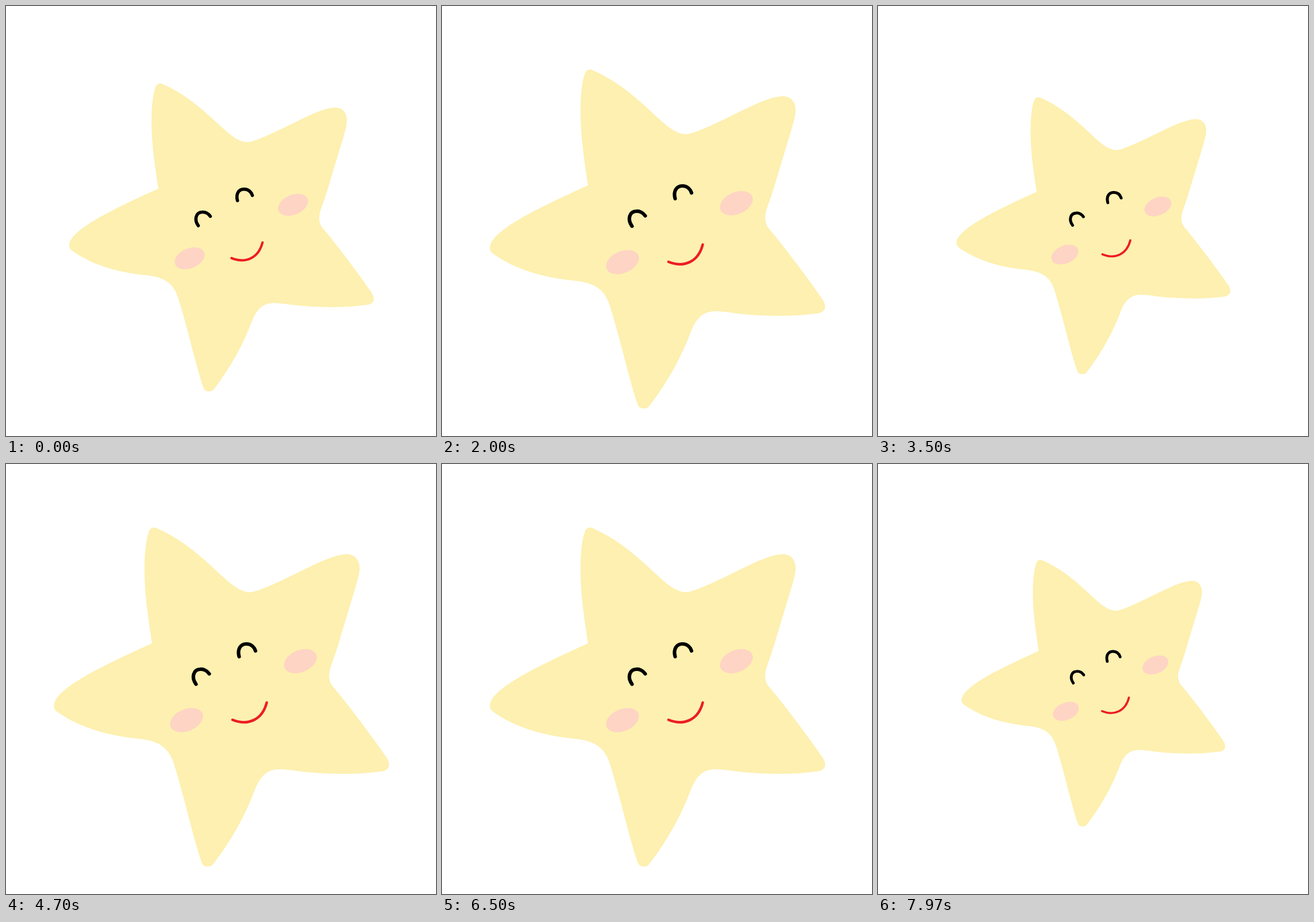
An HTML page that plays this animation: 748 px wide and 748 px high, repeating every 8000 ms.

```html
<!DOCTYPE html>
<html lang="en">
<head>
<meta charset="utf-8">
<title>Pulsing star</title>
<style>
  html, body { margin: 0; width: 100%; height: 100%; overflow: hidden; background: #fff; }
  svg { display: block; width: 100%; height: 100%; }
</style>
</head>
<body>
<svg viewBox="0 0 748 748">
  <g id="star" fill="none" stroke-linecap="round">
    <path fill="#fdf0b0" d="M254 312
      C246 260 241 222 241 183 C241 153 244 130 248.500 118 C251.500 110 257 109 264 112.500
      C298 127 331 153 362 182 C388 206 405 223 425 223
      C440 223 497 194 530 178 C560 163.500 580 157 593 157 C607 157 615 167 615 181
      C615 190 612 200 609 211 L583 297 C576 322 571 335 565.500 351
      C560 367 561 379 570 389 C583 403 638 475 661 509
      C671 524 666 532 655 534.500 C615 540 575 540 535 537
      C510 535 490 531 475 531 C453 531 442 545 434 564
      C416 612 393 653 362 694 C358 700 355 700 350 700 C344 700 342 697 340 692
      C327 655 309 575 292.500 523 C284 495 268 482 232 478
      C180 473 130 460 89 431 C82 426 82 419 86 411 C102 383 170 350 254 312 Z"/>
    <g fill="#fed4c4">
      <ellipse rx="30" ry="19" transform="translate(314 445.500) rotate(-23)"/>
      <ellipse rx="30" ry="19" transform="translate(512 343) rotate(-23)"/>
    </g>
    <g stroke="#000" stroke-width="6.200">
      <path d="M330.500 383 C322 371 326 357.500 338 357 C344 356.500 350 360 353.500 365"/>
      <path d="M405.500 335 C402 322 408 313 418 313 C427 313 432 319 434 325"/>
    </g>
    <path stroke="#ed1c24" stroke-width="4.500" d="M394 445 C421 456 446 445 453.500 415"/>
  </g>
</svg>
<script>
  const star = document.getElementById('star');
  const LOOP = 8000, FRAME = 100 / 3;
  const GROW = 400, SHRINK = 500, PEAK_AT = 144.6;
  const MIN = 0.743, MAX = 1.146;
  const DRAWN_SCALE = 1.101;

  function scaleAt(ms) {
    const period = GROW + SHRINK;
    const phase = (ms - PEAK_AT + period) % period;
    const level = phase < SHRINK ? 1 - phase / SHRINK : (phase - SHRINK) / GROW;
    return MIN + (MAX - MIN) * level;
  }

  function draw() {
    const time = performance.now() % LOOP;
    // 30 steps a second, step times rounded to 10 ms
    const step = Math.min(239, Math.floor((time + 4) / FRAME));
    const k = scaleAt(step * FRAME) / DRAWN_SCALE;
    star.setAttribute('transform', `translate(374 374) scale(${k}) translate(-374 -374)`);
    requestAnimationFrame(draw);
  }
  draw();
</script>
</body>
</html>
```
